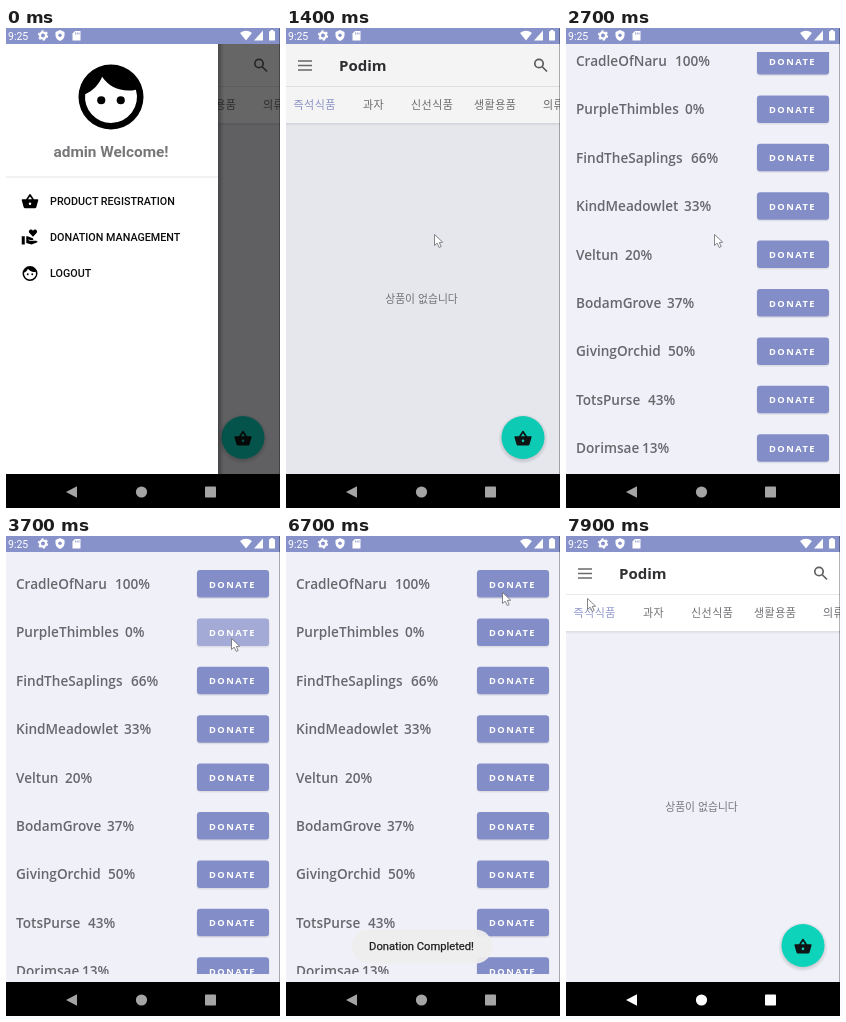
Animation of 274 by 480 pixels, one loop 8 s. Source, as an HTML page:

```html
<!DOCTYPE html>
<html lang="ko">
<head>
<meta charset="utf-8">
<title>Donation app</title>
<style>
html, body { margin: 0; width: 100%; height: 100%; overflow: hidden; background: #000; }
svg { display: block; width: 100vw; height: 100vh; }
text { white-space: pre; }
.soft { filter: blur(.45px); }
.ko { font-family: "Noto Sans CJK KR", "Noto Sans CJK JP", sans-serif; font-weight: 500; }
.ui { font-family: Roboto, sans-serif; font-weight: 500; }
.hum { font-family: "Open Sans", sans-serif; font-weight: 600; }
.tab { font-size: 11px; letter-spacing: .45px; fill: #6f6f73; }
.row { font-size: 13.6px; fill: #67676c; }
.btn { font-size: 9.3px; letter-spacing: 1.45px; font-weight: 700; fill: #fff; }
.item { font-size: 10.75px; fill: #0c0c0c; }
</style>
</head>
<body>
<svg viewBox="0 0 274 480" xmlns="http://www.w3.org/2000/svg">
  <defs>
    <clipPath id="listClip"><rect y="24" width="274" height="414"/></clipPath>
    <clipPath id="pageClip"><rect y="16" width="274" height="430"/></clipPath>
    <linearGradient id="down" x2="0" y2="1">
      <stop stop-color="#000" stop-opacity=".09"/><stop offset="1" stop-color="#000" stop-opacity="0"/>
    </linearGradient>
    <linearGradient id="side">
      <stop stop-color="#000" stop-opacity=".3"/><stop offset="1" stop-color="#000" stop-opacity="0"/>
    </linearGradient>
    <radialGradient id="halo">
      <stop offset=".8" stop-color="#000" stop-opacity=".16"/><stop offset="1" stop-color="#000" stop-opacity="0"/>
    </radialGradient>
    <path id="basket" fill-rule="evenodd" d="M5.2 -3L.8 -9.6Q0 -10.4 -.8 -9.6L-5.2 -3H-10Q-11.3 -3 -11 -1.7L-8.4 7.5Q-8 9 -6.5 9H6.5Q8 9 8.4 7.5L11 -1.7Q11.3 -3 10 -3ZM-2.600 -3L0 -6.8L2.600 -3ZM0 4.700A1.700 1.700 0 1 1 0 1.300A1.700 1.700 0 1 1 0 4.700Z"/>
    <g id="face">
      <path fill-rule="evenodd" d="M0 -10A10 10 0 1 1 0 10A10 10 0 1 1 0 -10ZM0 8A8 8 0 0 0 7.67 -2.26C3.6 -1.3 -.6 -2.9 -2.74 -6.23C-3.7 -3.8 -5.6 -1.9 -7.95 -.86A8 8 0 0 0 0 8Z"/>
      <circle cx="-3" cy="1" r="1.25"/><circle cx="3" cy="1" r="1.25"/>
    </g>
    <g id="giving">
      <path d="M-11 -1H-7V10H-11ZM-5 -1H-3.2L3.6 1.6Q5 2.4 4.2 4H0L-2 3.2L-2.3 4.1L0 5H8Q10 5 10 7L2 10L-5 8Z"/>
      <path d="M4 -.5L-1 -5.6C-3 -8.5 1.5 -12 4 -8.5C6.5 -12 11 -8.5 9 -5.6Z"/>
    </g>
  </defs>

  <g clip-path="url(#pageClip)">
    <g id="home">
      <rect y="16" width="274" height="430" fill="#f0f0f8"/>
      <rect y="95" width="274" height="3" fill="url(#down)"/>
      <rect y="16" width="274" height="79" fill="#fff"/>
      <rect y="58" width="274" height="1" fill="#e9e9ec"/>
      <g class="soft">
        <path d="M12 33H26M12 37.5H26M12 42H26" stroke="#6b6b6b" stroke-width="1.5"/>
        <text class="hum" x="53" y="43" font-size="15" style="font-weight:700" fill="#303033">Podim</text>
        <g fill="none" stroke="#606060" stroke-width="1.7"><circle cx="253" cy="35.5" r="4.2"/><path d="M256 38.5L261 43.5"/></g>
        <g id="tabs"></g>
        <text class="ko" x="135.500" y="275" font-size="10.8" text-anchor="middle" fill="#77777b">상품이 없습니다</text>
      </g>
      <circle cx="237" cy="411" r="25" fill="url(#halo)"/>
      <g class="soft">
        <circle cx="237" cy="409.500" r="21.500" fill="#0dd3bb"/>
        <use href="#basket" transform="translate(237 410.500) scale(.78)" fill="#101414"/>
      </g>
    </g>
    <rect id="scrim" y="16" width="274" height="430"/>
    <g id="drawer">
      <rect x="212" y="16" width="6" height="430" fill="url(#side)"/>
      <rect y="16" width="212" height="430" fill="#fff"/>
      <rect y="148.500" width="212" height="1" fill="#e6e6e6"/>
      <rect id="touch" y="191" width="212" height="36"/>
      <g class="soft">
        <use href="#face" transform="translate(105 69) scale(3.25)"/>
        <text class="ui" x="105" y="129" font-size="15.4" text-anchor="middle" style="font-weight:700" fill="#77777a">admin Welcome!</text>
        <use href="#basket" transform="translate(24 173.500) scale(.75)"/>
        <use href="#giving" transform="translate(24 209) scale(.75)"/>
        <use href="#face" transform="translate(24 245.500) scale(.75)"/>
        <text class="ui item" x="44" y="177">PRODUCT REGISTRATION</text>
        <text class="ui item" x="44" y="213">DONATION MANAGEMENT</text>
        <text class="ui item" x="44" y="249">LOGOUT</text>
      </g>
    </g>
    <g id="donate">
      <rect y="16" width="274" height="460" fill="#f0f0f8"/>
      <g clip-path="url(#listClip)"><g id="list" class="soft"></g></g>
    </g>
  </g>

  <g id="toast" class="soft">
    <rect id="pill" y="393.500" height="34" rx="17" fill="#efeeee"/>
    <text id="note" class="ui" x="135.500" y="414" font-size="11.2" text-anchor="middle" style="font-weight:400" fill="#111" stroke="#111" stroke-width=".25"></text>
  </g>

  <rect width="274" height="16" fill="#8791ca"/>
  <g fill="#fff" class="soft">
    <text class="ui" x="2" y="11.500" font-size="10.5" style="font-weight:400">9:25</text>
    <circle cx="37" cy="7.500" r="3" fill="none" stroke="#fff" stroke-width="2"/>
    <circle cx="37" cy="7.500" r="4.500" fill="none" stroke="#fff" stroke-width="1.4" stroke-dasharray="2.35 2.362"/>
    <path d="M54 2L58.5 4V7.5Q58 11.5 54 13Q50 11.5 49.5 7.5V4Z"/>
    <circle cx="54" cy="7.300" r="1.700" fill="#8791ca"/>
    <path d="M69 3H74.5V12.5H66.5V5.5Z"/>
    <path d="M69.5 4.5V6.5M71.3 4.5V6.5M73 4.5V6.5" stroke="#8791ca" stroke-width=".8"/>
    <path d="M234 5Q240 .5 246 5L240 12.5Z"/>
    <path d="M257 2.5V12.5H248Z"/>
    <path d="M264.500 2H267.500V3.200H269V12.500H263V3.200H264.500Z"/>
  </g>

  <rect y="446" width="274" height="34"/>
  <circle id="backGlow" cx="66" cy="464" r="15" fill="#fff"/>
  <g id="nav" class="soft">
    <path d="M60 464L71 458.300V469.700Z"/><circle cx="135.500" cy="464" r="5.600"/><rect x="199" y="458.500" width="11" height="11" rx=".8"/>
  </g>
  <rect x="273" width="1" height="480" opacity=".3"/>
  <g id="cursor">
    <path class="soft" d="M.5 .5V11.5L3.2 9.2L5.2 13.5L7.2 12.5L5.3 8.5L8.7 8.2Z" fill="#fff" stroke="#77777c" stroke-width=".9" stroke-linejoin="round"/>
  </g>
</svg>
<script>
const LOOP = 8000;
const $ = id => document.getElementById(id);
const set = (id, attrs) => { for (const k in attrs) $(id).setAttribute(k, attrs[k]); };
const shift = (id, x, y) => set(id, { transform: `translate(${x} ${y})` });

const tabs = [["즉석식품", 7.5], ["과자", 77], ["신선식품", 125], ["생활용품", 188], ["의류", 257]];
$("tabs").innerHTML = tabs.map(([label, x], i) =>
  `<text class="ko tab" x="${x}" y="81"${i ? "" : ' style="fill:#8d96cb"'}>${label}</text>`).join("");

// name, share, x of the share
const rows = [
  ["CradleOfNaru", 100, 109], ["PurpleThimbles", 0, 119], ["FindTheSaplings", 66, 125],
  ["KindMeadowlet", 33, 118], ["Veltun", 20, 59], ["BodamGrove", 37, 101],
  ["GivingOrchid", 50, 102], ["TotsPurse", 43, 82], ["Dorimsae", 13, 76]
];
$("list").innerHTML = rows.map(([name, share, x], i) => `
  <g transform="translate(0 ${48 + i * 48.4})">
    <text class="hum row" x="10" y="5">${name}</text>
    <text class="hum row" x="${x}" y="5">${share}%</text>
    <rect x="190.500" y="-13.500" width="73" height="28.500" rx="3.500" fill="#000" opacity=".08"/>
    <rect x="191" y="-14" width="72" height="27.500" rx="3" fill="#838dc7"/>
    <rect id="flash${i}" x="191" y="-14" width="72" height="27.500" rx="3" fill="#fff" opacity="0"/>
    <text class="hum btn" x="203" y="3.500">DONATE</text>
  </g>`).join("");

// Eased value between [time, value] keys
function track(t, keys) {
  if (t <= keys[0][0]) return keys[0][1];
  for (let i = 1; i < keys.length; i++) {
    const [t0, a] = keys[i - 1], [t1, b] = keys[i];
    if (t < t1) {
      const p = (t - t0) / (t1 - t0);
      return a + (b - a) * p * p * (3 - 2 * p);
    }
  }
  return keys[keys.length - 1][1];
}
const pulse = (t, from, to, fade) => track(t, [[from - fade, 0], [from, 1], [to, 1], [to + fade, 0]]);

const path = [
  [50, 266, 278], [500, 92, 240], [900, 148, 206], [2800, 148, 206], [3400, 225, 102],
  [4250, 225, 102], [4400, 216, 142], [4600, 216, 142], [4750, 214, 102], [5400, 214, 102],
  [5800, 216, 56], [6750, 216, 56], [7100, 65, 462], [7300, 65, 462], [7850, 21, 62]
];
const pathX = path.map(([t, x]) => [t, x]);
const pathY = path.map(([t, , y]) => [t, y]);

const toasts = [
  { from: 4950, to: 5850, text: "Lack of Donation Amount", width: 160 },
  { from: 6550, to: 7500, text: "Donation Completed!", width: 141 }
];

function draw(t) {
  shift("drawer", track(t, [[1000, 0], [1350, -220]]), 0);
  set("scrim", { opacity: track(t, [[1000, .6], [1350, .07], [1400, .045], [1600, 0]]) });
  set("touch", { opacity: .1 * pulse(t, 950, 1050, 80) });

  const shown = track(t, [[1500, 0], [1750, 1], [7230, 1], [7500, 0]]);
  set("donate", { opacity: shown });
  shift("donate", 0, 36 * (1 - shown));
  shift("list", 0, track(t, [[1850, 0], [2080, -15], [2780, -15], [3150, 0]]));
  set("flash1", { opacity: .25 * Math.max(pulse(t, 3690, 3800, 80), pulse(t, 4800, 4880, 80)) });
  set("flash0", { opacity: .25 * pulse(t, 5920, 6000, 80) });

  const toast = toasts[t < 6250 ? 0 : 1];
  set("toast", { opacity: .95 * pulse(t, toast.from, toast.to, 150) });
  set("pill", { x: 136 - toast.width / 2, width: toast.width });
  if ($("note").textContent !== toast.text) $("note").textContent = toast.text;

  set("backGlow", { opacity: .25 * pulse(t, 7150, 7220, 80) });
  set("nav", { fill: t < 7200 ? "#a5a5a5" : "#fff" });
  set("cursor", { opacity: t < 80 ? 0 : 1 });
  shift("cursor", track(t, pathX), track(t, pathY));
}

const start = performance.now();
function tick() {
  draw((performance.now() - start) % LOOP);
  requestAnimationFrame(tick);
}
tick();
</script>
</body>
</html>
```
